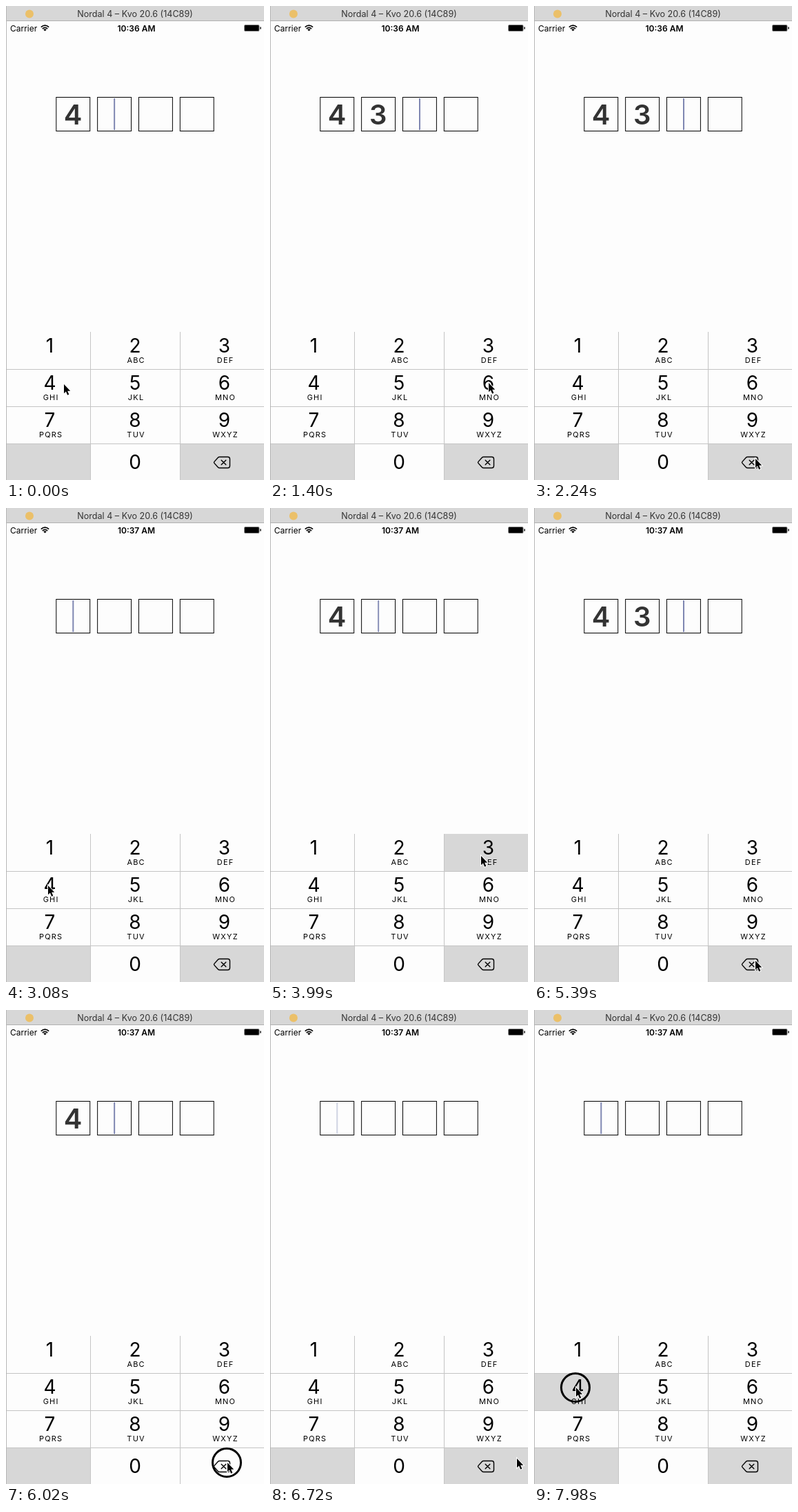
Recreate the animation shown at these times as an HTML page. Size 374 by 688 pixels, loop 8000 ms.

```html
<!DOCTYPE html>
<html lang="en">
<head>
<meta charset="utf-8">
<title>Code entry</title>
<style>
html, body { margin: 0; width: 100%; height: 100%; overflow: hidden; background: #fdfdfd; }
svg { display: block; width: 374px; height: 688px; font-family: Inter, Roboto, sans-serif; }
text { text-anchor: middle; }
.num { font-size: 28px; }
.sub { font-size: 11px; letter-spacing: 1.2px; }
.code { font-size: 40px; font-weight: 600; fill: #333; }
</style>
</head>
<body>
<svg viewBox="0 0 374 688">
  <rect width="374" height="688" fill="#fdfdfd"/>
  <rect width="374" height="21" fill="#d7d7d7"/>
  <path d="M0 21.5H374" stroke="#b0b0b0"/>
  <circle cx="34" cy="11.5" r="6" fill="#ebc069"/>
  <text x="187" y="16" font-size="12.6" fill="#333">Nordal 4 – Kvo 20.6 (14C89)</text>

  <text x="6" y="37" font-size="12" style="text-anchor:start">Carrier</text>
  <g fill="none" stroke="#000" stroke-width="1.7">
    <path d="M50.8 30.6Q56.5 25.6 62.2 30.6M52.9 33Q56.5 29.8 60.1 33"/>
    <path d="M54.3 34.2Q56.5 32.4 58.7 34.2L56.5 36.6Z" fill="#000" stroke="none"/>
  </g>
  <text id="clock" x="189" y="37" font-size="12" font-weight="600"></text>
  <rect x="345.5" y="27.5" width="21.5" height="9" rx="1.5" stroke="#888"/>
  <rect x="368.3" y="30.3" width="1.4" height="3.4" rx=".7"/>

  <g id="cells"></g>
  <rect id="caret" y="134" width="2" height="46" fill="#7f87b2"/>

  <g id="keys"></g>
  <path d="M0 527.5H374M0 581.5H374M0 635.5H374M122.5 473V688M252.5 473V688" fill="none" stroke="#c4c4c4"/>
  <g id="labels"></g>
  <g fill="none" stroke="#000" stroke-width="1.4" stroke-linejoin="round" stroke-linecap="round">
    <path d="M309.5 654.5H321.5Q324.5 654.5 324.5 657.5V667.5Q324.5 670.5 321.5 670.5H309.5Q308.3 670.5 307.3 669.5L302 663.6Q301 662.5 302 661.4L307.3 655.5Q308.3 654.5 309.5 654.5Z"/>
    <path d="M312.2 659.2L318.8 665.8M318.8 659.2L312.2 665.8"/>
  </g>
  <path d="M.5 0V688" stroke="#b8b8b8"/>

  <g id="pointer">
    <circle id="ring" cy="1" r="20.5" fill="none" stroke="#000" stroke-width="3"/>
    <path transform="translate(1 1) scale(.87)" d="M0 0V15.2L3.4 12L5.9 18L8.4 17L5.9 11.2H10.6Z" stroke="#fff" stroke-width="2.2" paint-order="stroke"/>
  </g>
</svg>
<script>
const $ = id => document.getElementById(id);
const LOOP = 8000, STEP = 70, SCALE = 374 / 375;
const GREY = '#d7d7d7', WHITE = '#fdfdfd', DEL = '<';

// Where the pointer stops: on keys, or idle.
const spots = {
  3: [305, 504], 4: [60, 547], 6: [316, 546], 9: [317, 602], [DEL]: [320, 656],
  start: [83, 548], rest: [357, 650], turn: [241, 619]
};
// Time of each tap, or of leaving an idle stop.
const stops = [
  [140, 'start'], [910, '3'], [1470, '6'], [1750, DEL], [2450, DEL], [2660, DEL],
  [3220, '4'], [3850, '3'], [4200, '6'], [4550, '9'],
  [4970, DEL], [5320, DEL], [5600, DEL], [6020, DEL],
  [6860, 'rest'], [7770, 'turn'], [7910, '4']
].map(([down, key], i, all) => {
  const tap = key.length === 1;
  const quick = i > 0 && all[i - 1][1] === key;
  return {
    down, key, tap,
    lit: down + (quick ? 0 : STEP),
    up: down + (!tap ? 0 : quick ? STEP : 3 * STEP)
  };
});

const cellX = i => (72.5 + 60 * i) * SCALE;
const keyRects = {}, slots = [];
const subs = ['', 'ABC', 'DEF', 'GHI', 'JKL', 'MNO', 'PQRS', 'TUV', 'WXYZ'];
const colX = [0, 122, 252, 374], colMid = [63.5, 187, 316.5];

function add(parent, tag, attrs, text = '') {
  const el = document.createElementNS('http://www.w3.org/2000/svg', tag);
  for (const name in attrs) el.setAttribute(name, attrs[name]);
  el.textContent = text;
  return $(parent).appendChild(el);
}

[...'123456789', 'blank', '0', DEL].forEach((key, i) => {
  const col = i % 3, y = 473 + 54 * Math.floor(i / 3);
  keyRects[key] = add('keys', 'rect', {
    x: colX[col], y, width: colX[col + 1] - colX[col], height: 54
  });
  if (key === 'blank' || key === DEL) return;
  add('labels', 'text', { class: 'num', x: colMid[col], y: y + (key === '0' ? 37 : 30) }, key);
  add('labels', 'text', { class: 'sub', x: colMid[col] + 1.6, y: y + 45 }, subs[i]);
});

for (let i = 0; i < 4; i++) {
  const x = cellX(i);
  add('cells', 'rect', { x: x + .5, y: 132.5, width: 48.9, height: 49, fill: 'none', stroke: '#000' });
  slots.push(add('cells', 'text', { class: 'code', x: x + 24.7, y: 171.5 }));
}

// Each move starts on release and settles shortly before the next tap.
function pointerAt(t) {
  const i = stops.findLastIndex(s => t >= s.up);
  const from = stops[Math.max(i, 0)], to = stops[i + 1] || from;
  const time = Math.max(to.down - from.up - 2 * STEP, STEP);
  const p = Math.min(1, Math.max(0, (t - from.up) / time));
  const ease = p * p * (3 - 2 * p), end = spots[to.key];
  return spots[from.key].map((v, k) => v + (end[k] - v) * ease);
}

function caretOpacity(age) {
  const phase = age % 1000;
  if (phase < 550) return 1;
  if (phase < 675) return 1 - (phase - 550) / 125;
  return Math.min(1, Math.max(0, (phase - 750) / 140));
}

function draw(t) {
  let code = '4', edited = -STEP, ring = false, lit = null;
  for (const s of stops.filter(s => s.tap)) {
    if (t >= s.up) {
      code = s.key === DEL ? code.slice(0, -1) : code + s.key;
      edited = s.up;
    } else {
      if (t >= s.down && t < s.down + 2 * STEP) ring = true;
      if (t >= s.lit) lit = s.key;
    }
  }
  for (const key in keyRects) {
    const grey = key === 'blank' || (key === DEL) !== (key === lit);
    keyRects[key].setAttribute('fill', grey ? GREY : WHITE);
  }
  slots.forEach((slot, i) => slot.textContent = code[i] || '');
  $('caret').setAttribute('x', cellX(code.length) + 24);
  $('caret').setAttribute('opacity', code.length < 4 ? caretOpacity(t - edited) : 0);
  $('clock').textContent = t < 2590 ? '10:36 AM' : '10:37 AM';
  $('ring').setAttribute('visibility', ring ? 'visible' : 'hidden');
  $('pointer').setAttribute('transform', `translate(${pointerAt(t)})`);
}

function tick() {
  const t = performance.now() % LOOP;
  draw(Math.floor(t / STEP) * STEP);
  requestAnimationFrame(tick);
}
tick();
</script>
</body>
</html>
```
